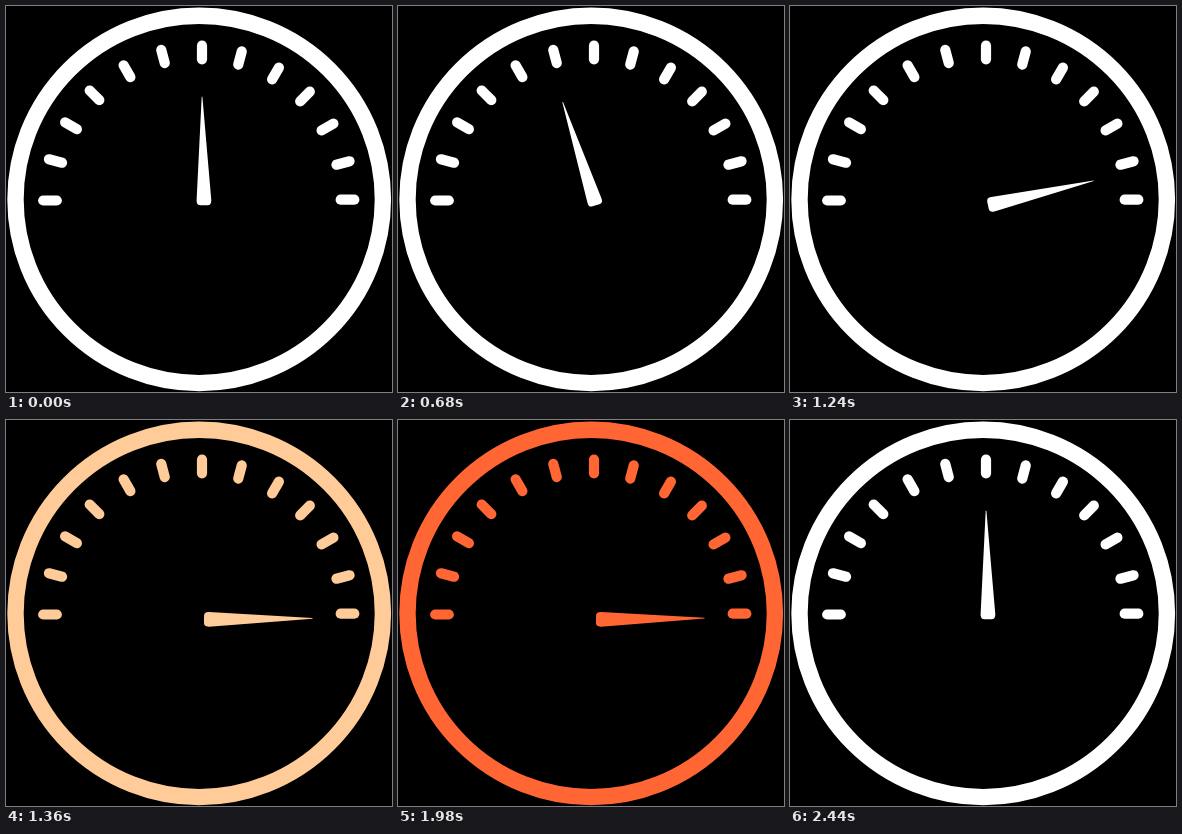
An HTML page with a canvas for the animation above (2460 ms loop, 386 px wide and 386 px high).

```html
<!DOCTYPE html>
<html lang="en">
<head>
<meta charset="utf-8">
<title>Gauge</title>
<style>
  html, body { margin: 0; width: 100%; height: 100%; overflow: hidden; background: #000; }
  canvas { display: block; width: 386px; height: 386px; }
</style>
</head>
<body>
<canvas id="stage" width="386" height="386"></canvas>
<script>
const ctx = document.getElementById('stage').getContext('2d');
const LOOP = 2460, STEP = 20;

// Tick centres, left to right, 15 degrees apart
const TICKS = [
  [44, 194.5], [49.5, 155], [65, 119.8], [88.5, 89.3], [121, 65.2], [157, 50.5], [196, 46.5],
  [234, 52], [269.5, 67.5], [299, 90.5], [321.5, 121], [337, 157], [341.5, 193.7]
];

// [time in ms, value]
const ANGLE = [
  [0, 0], [235, -30], [475, 0], [705, -17], [960, 72.3],
  [1120, 58], [1340, 90.5], [1960, 90.5], [2440, 0]
];
const HEAT = [[0, 0], [1310, 0], [1460, 1], [1960, 1], [2060, 0]];

const linear = x => x;
const easeInOut = x => x < 0.5
  ? 0.5 * Math.pow(2 * x, 2.7)
  : 1 - 0.5 * Math.pow(2 - 2 * x, 2.7);

function valueAt(keys, t, ease) {
  for (let i = 1; i < keys.length; i++) {
    const [t0, v0] = keys[i - 1], [t1, v1] = keys[i];
    if (t <= t1) return v0 + (v1 - v0) * ease((t - t0) / (t1 - t0));
  }
  return keys[keys.length - 1][1];
}

// White to red, in coarse colour levels
function heatColor(p) {
  const level = v => Math.round(v / 51) * 51;
  return `rgb(255,${level(255 - 204 * p)},${level(255 - 255 * p)})`;
}

function drawTick([x, y], i) {
  const a = i * Math.PI / 12, dx = 6.8 * Math.cos(a), dy = 6.8 * Math.sin(a);
  ctx.beginPath();
  ctx.moveTo(x - dx, y - dy);
  ctx.lineTo(x + dx, y + dy);
  ctx.stroke();
}

function drawNeedle(deg) {
  ctx.save();
  ctx.translate(198, 199.3);
  ctx.rotate(deg * Math.PI / 180);
  ctx.beginPath();
  ctx.moveTo(-1.6, -108.5);
  ctx.lineTo(7.3, -5);
  ctx.quadraticCurveTo(7.5, 0, 3.5, 0);
  ctx.lineTo(-3.5, 0);
  ctx.quadraticCurveTo(-7.7, 0, -7.4, -5);
  ctx.lineTo(-2.3, -108.5);
  ctx.fill();
  ctx.restore();
}

function draw(t) {
  ctx.fillStyle = '#000';
  ctx.fillRect(0, 0, 386, 386);
  ctx.fillStyle = ctx.strokeStyle = heatColor(valueAt(HEAT, t, linear));

  ctx.lineWidth = 16.4;
  ctx.beginPath();
  ctx.arc(193.2, 193.4, 183.7, 0, Math.PI * 2);
  ctx.stroke();

  ctx.lineWidth = 10.2;
  ctx.lineCap = 'round';
  TICKS.forEach(drawTick);
  drawNeedle(valueAt(ANGLE, t, easeInOut));
}

const start = performance.now();
function tick() {
  const t = (performance.now() - start) % LOOP;
  draw(Math.floor(t / STEP) * STEP);
  requestAnimationFrame(tick);
}
tick();
</script>
</body>
</html>
```
